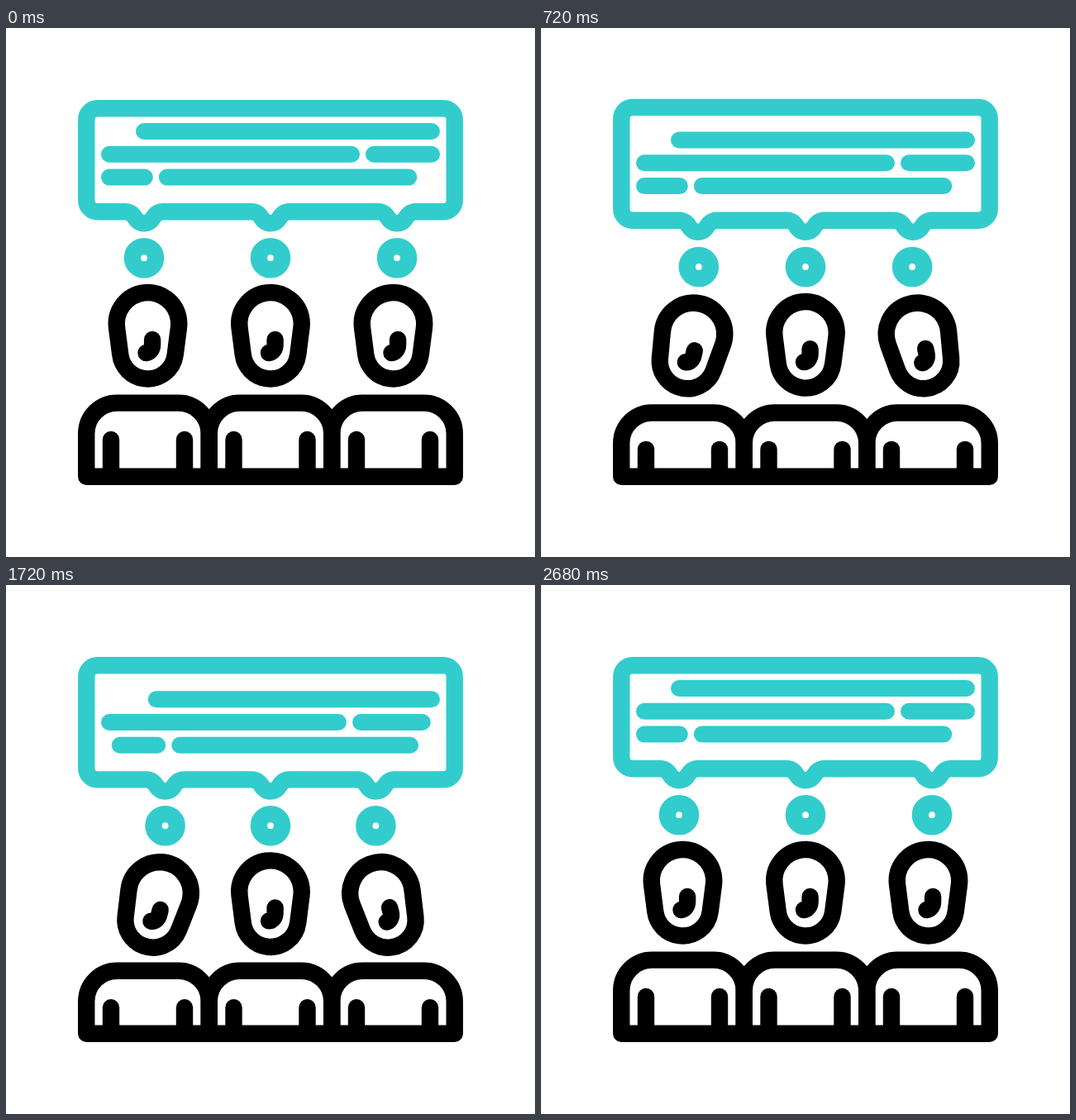
An HTML page with a canvas that plays this animation: 640x640 px, repeating every 3 s.

```html
<!DOCTYPE html>
<html lang="en">
<head>
<meta charset="utf-8">
<title>Group discussion</title>
<style>
html, body { margin: 0; width: 100%; height: 100%; overflow: hidden; background: #fff; }
canvas { display: block; width: 640px; height: 640px; }
</style>
</head>
<body>
<canvas width="640" height="640"></canvas>
<script>
const ctx = document.querySelector('canvas').getContext('2d');
const LOOP = 3000, STEP = 40;
const TEAL = '#33cccc', BLACK = '#000';
const CENTER = 320, SPACING = 148.5;

const smooth = s => s * s * (3 - 2 * s);
const mix = (a, b, k) => a + (b - a) * k;

// Eased value through [time, value] keys, held at both ends.
function track(t, keys) {
  if (t <= keys[0][0]) return keys[0][1];
  for (let i = 1; i < keys.length; i++) {
    const [t0, v0] = keys[i - 1], [t1, v1] = keys[i];
    if (t < t1) return mix(v0, v1, smooth((t - t0) / (t1 - t0)));
  }
  return keys[keys.length - 1][1];
}

// Jump up, settle low, rise again, then come back to rest.
const motion = (t, up, low, rise) =>
  track(t, [[200, 0], [400, up], [800, low], [1800, low], [2200, rise], [2600, 0]]);

function stroke(build) {
  ctx.beginPath();
  build();
  ctx.stroke();
}

function line(x0, y0, x1, y1) {
  stroke(() => { ctx.moveTo(x0, y0); ctx.lineTo(x1, y1); });
}

function bubble(top, bottom, tailGap) {
  const left = 97.3, right = 542.7, r = 13.5;
  stroke(() => {
    ctx.moveTo(left + r, top);
    ctx.arcTo(right, top, right, bottom, r);
    ctx.arcTo(right, bottom, left, bottom, r);
    for (const side of [1, 0, -1]) {
      const x = CENTER + side * tailGap;
      ctx.lineTo(x + 23, bottom);
      ctx.bezierCurveTo(x + 16, bottom, x + 13, bottom + 4, x + 10, bottom + 8.6);
      ctx.arc(x, bottom + 2, 12, Math.atan2(6.6, 10), Math.atan2(6.6, -10));
      ctx.bezierCurveTo(x - 13, bottom + 4, x - 16, bottom, x - 23, bottom);
    }
    ctx.arcTo(left, bottom, left, top, r);
    ctx.arcTo(left, top, right, top, r);
    ctx.closePath();
  });
}

function textLines(y, k) {
  const row = (n, a, b) => line(a, y + n * 27.8, b, y + n * 27.8);
  const split = (n, start, gap, end) => {
    row(n, start, gap - 13.5);
    row(n, gap + 13.5, end);
  };
  row(0, mix(167, 365.3, k), 515);
  split(1, 125, mix(431.5, 216.5, k), mix(515, 363, k));
  split(2, mix(125, 297, k), mix(181.3, 389.5, k), mix(487.3, 511, k));
}

function head(x, dy, tilt) {
  const pivot = 417, taper = Math.asin((37.75 - 33.5) / 33.2);
  ctx.save();
  ctx.translate(x, pivot + dy);
  ctx.rotate(tilt);
  stroke(() => {
    ctx.arc(0, 357.75 - pivot, 37.75, Math.PI - taper, taper);
    ctx.arc(0, 391 - pivot, 33.5, taper, Math.PI - taper);
    ctx.closePath();
  });
  stroke(() => {
    ctx.moveTo(5.6, 377 - pivot);
    ctx.lineTo(5.6, 383 - pivot);
    ctx.bezierCurveTo(5.6, 388.5 - pivot, 2.5, 392.7 - pivot, -2, 393 - pivot);
  });
  ctx.restore();
}

function body(x, dy, armDy) {
  const half = 74.25, top = 453.6 + dy, base = 542.7;
  stroke(() => {
    ctx.moveTo(x - half, base);
    ctx.arcTo(x - half, top, x, top, 37);
    ctx.arcTo(x + half, top, x + half, base, 37);
    ctx.lineTo(x + half, base);
    ctx.closePath();
  });
  for (const side of [-1, 1]) {
    line(x + side * 44.5, 498 + armDy, x + side * 44.5, base);
  }
}

function draw(t) {
  ctx.fillStyle = '#fff';
  ctx.fillRect(0, 0, 640, 640);
  ctx.lineWidth = 20.4;
  ctx.lineCap = ctx.lineJoin = 'round';

  const topShift = motion(t, -13, 0, -13);
  const bottomShift = motion(t, -13, 13.2, 0);
  const lean = track(t, [[400, 0], [800, 1], [2200, 1], [2600, 0]]);

  ctx.strokeStyle = TEAL;
  bubble(97.3 + topShift, 222.2 + bottomShift, 153 - 25.6 * lean);
  ctx.lineWidth = 20;
  textLines(125 + bottomShift, track(t, [[800, 0], [1320, 1], [1800, 0]]));

  ctx.lineWidth = 20.4;
  const dotGap = 153 - motion(t, 8.5, 25.6, 8.5);
  const dotY = 278.2 + motion(t, -8.5, 13, -8.5);
  for (const side of [-1, 0, 1]) {
    stroke(() => ctx.arc(CENTER + side * dotGap, dotY, 14.1, 0, 2 * Math.PI));
  }

  ctx.strokeStyle = BLACK;
  const headShift = motion(t, -8.6, 13.4, -13);
  const bodyShift = end => track(t, [[400, 0], [800, 13.2], [1800, 13.2], [end, 0]]);
  const armShift = bodyShift(2200);
  for (const side of [-1, 0, 1]) {
    const x = CENTER + side * SPACING;
    head(x, headShift, -side * lean * 14.2 * Math.PI / 180);
    body(x, bodyShift(side === 1 ? 2400 : 2200), armShift);
  }
}

function tick() {
  const t = performance.now() % LOOP;
  draw(Math.floor(t / STEP) * STEP);
  requestAnimationFrame(tick);
}
tick();
</script>
</body>
</html>
```
